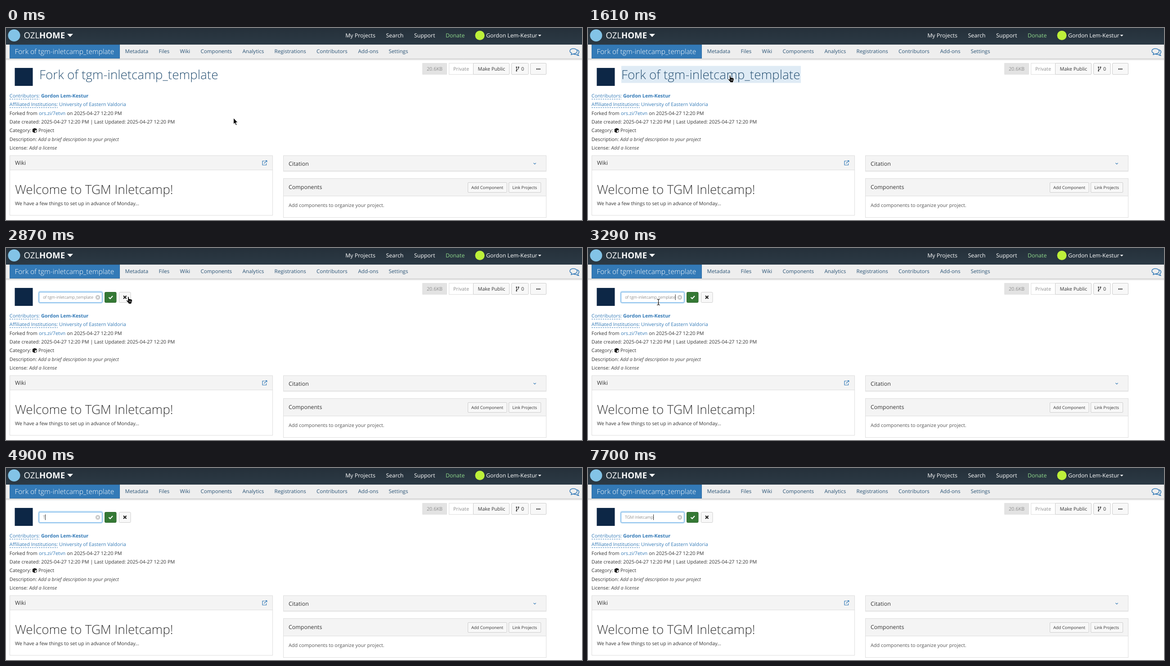
Write an HTML page that moves like this. It is 1280 px wide and 428 px high and loops after 8 s.

```html
<!DOCTYPE html>
<html lang="en">
<head>
<meta charset="utf-8">
<title>Project page</title>
<style>
  html, body { margin: 0; width: 100%; height: 100%; overflow: hidden; background: #fff; }
  svg { display: block; width: 100%; height: 100%; }
  text {
    font: 10.85px "Open Sans", "Noto Sans", sans-serif;
    fill: #333; white-space: pre; text-rendering: geometricPrecision;
  }
  .mid { text-anchor: middle; }
  .menu text { font-size: 12.4px; fill: #fff; }
  .tabs text { font-size: 11.6px; fill: #2a5375; }
  .head { font-size: 12.4px; }
  .small { font-size: 9.3px; }
  .big { font-size: 27.9px; font-weight: 300; }
  .link { fill: #337ab7; }
  .navy { fill: #2a5375; }
  .grey { fill: #8c8c8c; }
  .bold { font-weight: 700; }
  .it { font-size: 10.75px; font-style: italic; fill: #444; }
  .field { font-size: 9.3px; font-weight: 300; fill: #555; }
  .panel { fill: #fff; stroke: #ddd; }
  .bar { fill: #f4f4f4; stroke: #ddd; }
  .btn { fill: #f8f8f8; stroke: #ccc; }
  .dash { stroke: #337ab7; stroke-dasharray: 3 2; }
  .line { fill: none; stroke: #337ab7; stroke-width: 1.2; }
  .bubble { fill: #eee; stroke: #337ab7; stroke-width: 1.5; stroke-linejoin: round; }
  .pointer { fill: #000; stroke: #fff; stroke-linejoin: round; }
</style>
</head>
<body>
<svg viewBox="0 0 1280 428" preserveAspectRatio="none">
  <defs>
    <linearGradient id="dark" x2="0" y2="1">
      <stop stop-color="#25303a"/><stop offset="1" stop-color="#2c3a45"/>
    </linearGradient>
    <linearGradient id="shade" x2="0" y2="1">
      <stop stop-color="#000" stop-opacity=".2"/><stop offset="1" stop-color="#000" stop-opacity="0"/>
    </linearGradient>
    <path id="beamShape" d="M-3 0Q0 0 0 2Q0 0 3 0M0 2V11M-3 13Q0 13 0 11Q0 13 3 13M-1.5 8.5h3"/>
  </defs>
  <rect width="1280" height="428" fill="#fff"/>

  <!-- Top menu -->
  <rect width="1280" height="37" fill="url(#dark)"/>
  <circle cx="18" cy="16.5" r="13.5" fill="#83c3e6"/>
  <g class="menu">
    <text x="39.5" y="23" style="font-size:18.6px">OZL<tspan class="bold">HOME</tspan></text>
    <path d="M136 13h13l-6.5 7z" fill="#fff"/>
    <text x="754.2" y="20.7">My Projects</text>
    <text x="844.5" y="20.7">Search</text>
    <text x="907" y="20.7">Support</text>
    <text x="977" y="20.7" style="fill:#8fd98b">Donate</text>
    <circle cx="1053" cy="16.5" r="10.5" fill="#bdf03a"/>
    <text x="1067" y="20.7">Gordon Lem-Kestur</text>
    <path d="M1182.5 15h7l-3.5 3.7z" fill="#fff"/>
  </g>

  <!-- Project tabs -->
  <rect y="37" width="1280" height="31" fill="#eee"/>
  <rect y="68" width="1280" height="5" fill="url(#shade)"/>
  <rect x="8.5" y="37.5" width="244" height="30" fill="#337ab7" stroke="#2e6da4"/>
  <text x="19.5" y="57.5" style="font-size:15.5px;font-weight:300;fill:#fff">Fork of tgm-inletcamp_template</text>
  <g class="tabs">
    <text x="264.5" y="56.2">Metadata</text>
    <text x="339.5" y="56.2">Files</text>
    <text x="386.5" y="56.2">Wiki</text>
    <text x="432.5" y="56.2">Components</text>
    <text x="525.5" y="56.2">Analytics</text>
    <text x="596.5" y="56.2">Registrations</text>
    <text x="690" y="56.2">Contributors</text>
    <text x="782.5" y="56.2">Add-ons</text>
    <text x="850.5" y="56.2">Settings</text>
  </g>
  <path class="bubble" d="M1269 48.5c5.5 2 5.5 7 1.5 9q.3 2 2.5 4-4-.3-6-2.7-5 .5-8-2"/>
  <path class="bubble" d="M1255.5 59.5q2-1.500 2-3.300c-7-2.700-5.500-10.200 3.500-10.200 11 0 11 11.500 0 11.500q-2.500 1.700-5.500 2z"/>

  <!-- Project heading -->
  <rect x="19.5" y="89" width="40" height="40" fill="#0d2746"/>
  <g id="heading">
    <rect id="hover" x="74" y="84.5" width="399" height="38" fill="#dfebf5"/>
    <text class="big navy" x="74" y="114">Fork of tgm-inletcamp_template</text>
  </g>

  <g id="editor">
    <rect id="glow" x="73" y="97.5" width="141" height="24.5" rx="3" fill="none" stroke="#66afe9" stroke-width="4" stroke-opacity=".35"/>
    <rect x="73.5" y="98.5" width="140" height="23" rx="2" fill="#fff" stroke="#ccc"/>
    <rect id="ring" x="73.5" y="98.5" width="140" height="23" rx="2" fill="none" stroke="#5da8e6"/>
    <rect id="selection" x="82" y="103" width="113" height="14" fill="#b3d7fe"/>
    <text id="value" class="field" y="113.3"></text>
    <rect id="caret" y="103.5" width="1" height="12.5" fill="#222"/>
    <circle cx="204" cy="110" r="5.2" fill="#c8c8c8"/>
    <path d="M202 108l4 4m0-4l-4 4" stroke="#fff" stroke-width="1.2"/>
    <rect x="219.5" y="98.5" width="25.5" height="23" rx="2" fill="#357935" stroke="#2b652b"/>
    <path d="M228.5 110l3 3 5.500-6" fill="none" stroke="#fff" stroke-width="2.2"/>
    <rect class="btn" x="251.5" y="98.5" width="25.5" height="23" rx="2"/>
    <path d="M261 106.500l6.500 6.500m0-6.500l-6.500 6.500" stroke="#222" stroke-width="2.3"/>
  </g>

  <!-- Actions -->
  <rect x="925" y="78" width="55" height="26" fill="#e3e3e3" rx="1"/>
  <text class="mid grey" x="952.5" y="95">20.6KB</text>
  <rect class="panel" x="984.5" y="78.5" width="54" height="25"/>
  <text class="mid grey" x="1011.5" y="95">Private</text>
  <rect class="btn" x="1038.5" y="78.5" width="80" height="25" rx="1.5"/>
  <text class="mid" x="1078.8" y="95">Make Public</text>
  <rect class="btn" x="1123.5" y="78.5" width="37.5" height="25" rx="1.5"/>
  <path d="M1134.500 87v9m0-3q4.500-.5 4.500-4.500v-1" fill="none" stroke="#333" stroke-width="1.1"/>
  <g fill="#333">
    <circle cx="1134.5" cy="87.5" r="1.4"/>
    <circle cx="1139" cy="87.5" r="1.4"/>
    <circle cx="1134.5" cy="95.5" r="1.4"/>
  </g>
  <text x="1145" y="95">0</text>
  <rect class="btn" x="1165.5" y="78.5" width="35" height="25" rx="1.5"/>
  <g fill="#222">
    <circle cx="1179.7" cy="91.5" r="1.3"/>
    <circle cx="1183" cy="91.5" r="1.3"/>
    <circle cx="1186.3" cy="91.5" r="1.3"/>
  </g>

  <!-- Details -->
  <text class="link" x="7.8" y="154.8">Contributors:</text>
  <text class="link bold" x="78" y="154.8">Gordon Lem-Kestur</text>
  <path class="dash" d="M8 158.500h66M8 177.500h107"/>
  <text class="link" x="7.8" y="174.2">Affiliated Institutions:</text>
  <text class="link" x="118" y="174.2">University of Eastern Valdoria</text>
  <text x="7.8" y="193.5">Forked from</text>
  <text class="link" x="73" y="193.5">ors.zi/7etvn</text>
  <text x="135.3" y="193.5">on 2025-04-27 12:20 PM</text>
  <text x="7.8" y="212.9">Date created: 2025-04-27 12:20 PM | Last Updated: 2025-04-27 12:20 PM</text>
  <text x="7.8" y="232.3">Category:</text>
  <path d="M63.800 223l5 2.300v6.200l-5 2.500-5-2.500v-6.200z" fill="#222"/>
  <path d="M64.300 228.700l3.500-1.700v4l-3.500 1.800z" fill="#fff"/>
  <text x="72" y="232.3">Project</text>
  <text x="7.8" y="251.6">Description:</text>
  <text class="it" x="71.5" y="251.6">Add a brief description to your project</text>
  <text x="7.8" y="271">License:</text>
  <text class="it" x="51.5" y="271">Add a license</text>

  <!-- Wiki -->
  <rect class="panel" x="8.5" y="284.5" width="584" height="133"/>
  <rect class="bar" x="8.5" y="284.5" width="584" height="32"/>
  <text class="head" x="20" y="304.5">Wiki</text>
  <path class="line" d="M575 296.500h-5v9h8.500v-4M573.500 302l6-6.500m-3.500 0h3.700v3.700"/>
  <text class="big" x="20" y="369.7">Welcome to TGM Inletcamp!</text>
  <text x="20" y="394.5">We have a few things to set up in advance of Monday...</text>

  <!-- Citation and components -->
  <rect x="616" y="319" width="585" height="2" fill="#000" opacity=".06"/>
  <rect class="bar" x="616.5" y="284.5" width="584" height="34"/>
  <text class="head" x="628" y="306.5">Citation</text>
  <path class="line" d="M1172.300 300.800l2.700 2.700 2.700-2.700"/>
  <rect class="panel" x="616.5" y="335.5" width="584" height="87"/>
  <rect class="bar" x="616.5" y="335.5" width="584" height="39"/>
  <text class="head" x="628" y="359.3">Components</text>
  <rect class="btn" x="1026.5" y="344.5" width="86.5" height="22" rx="1.5"/>
  <text class="mid small" x="1069.5" y="358.8">Add Component</text>
  <rect class="btn" x="1117.5" y="344.5" width="71" height="22" rx="1.5"/>
  <text class="mid small" x="1152.5" y="358.8">Link Projects</text>
  <text x="628" y="399" style="fill:#555">Add components to organize your project.</text>

  <!-- Pointers, each with its hot spot at 0,0 -->
  <path id="arrow" class="pointer" d="M.5.5v14l3.100-2.800 2.200 5.200 2.300-1-2.200-5.100h4.300z"/>
  <g id="hand">
    <path class="pointer" d="M-1.300 0q1.300-1.300 2.600 0l.5 4.500 1.500-.3 1.200.8 1.500-.2 1 1 1.300.2.500 2-.8 4-1 1.500v2h-6l-1-2-4.500-5q.2-2 2-1l1.500 1.300z"/>
    <path d="M2 8v4M4 8v4M6 8v4" stroke="#fff" stroke-width=".6"/>
  </g>
  <g id="beam" fill="none" stroke-linecap="round">
    <use href="#beamShape" stroke="#fff" stroke-width="2.8"/>
    <use href="#beamShape" stroke="#111" stroke-width="1.2"/>
  </g>
</svg>
<script>
const LOOP = 8000, STEP = 70;
const OLD_NAME = "of tgm-inletcamp_template";
const NEW_NAME = "TGM Inletcamp";
const EDIT = 2100, SELECT = 3850, TYPE = 4900;
const keyTimes = [4900, 5110, 5250, 5460, 6090, 6230, 6440, 6650, 6930, 7140, 7350, 7420, 7700];

// Pointer path: time, x, y
const path = [
  [770, 505, 200], [1050, 384, 153], [1190, 384, 153], [1330, 348, 130],
  [1400, 326, 98], [1470, 314, 62], [1540, 314, 88], [1610, 315.5, 106],
  [2030, 315.5, 106], [2100, 311.5, 106], [2800, 311.5, 106],
  [2940, 232, 112], [3010, 188, 114], [3150, 156.5, 114]
];

const $ = id => document.getElementById(id);
const show = (id, on) => $(id).setAttribute("visibility", on ? "inherit" : "hidden");

function pointerAt(t) {
  const i = path.findIndex(p => p[0] > t);
  if (i < 0) return path[path.length - 1].slice(1);
  if (i === 0) return path[0].slice(1);
  const a = path[i - 1], b = path[i];
  const k = (t - a[0]) / (b[0] - a[0]);
  return [a[1] + (b[1] - a[1]) * k, a[2] + (b[2] - a[2]) * k];
}

function pointerKind(t, x, y) {
  if (t >= TYPE) return "";
  if (t < EDIT) return y > 84 && y < 122 && x < 473 ? "hand" : "arrow";
  if (x < 214) return "beam";
  return x < 245 || (x > 251 && x < 277) ? "hand" : "arrow";
}

function drawPointer(t) {
  const [x, y] = pointerAt(t);
  const kind = pointerKind(t, x, y);
  for (const id of ["arrow", "hand", "beam"]) show(id, id === kind);
  if (kind) $(kind).setAttribute("transform", `translate(${x} ${y})`);
  show("hover", kind === "hand" && t < EDIT);
}

function drawEditor(t) {
  const editing = t >= EDIT, typing = t >= TYPE;
  show("heading", !editing);
  show("editor", editing);

  const focus = Math.max(0, Math.min(1, (t - EDIT) / (2 * STEP)));
  $("ring").setAttribute("opacity", focus);
  $("glow").setAttribute("opacity", focus);

  const value = $("value");
  value.textContent = typing ? NEW_NAME.slice(0, keyTimes.filter(k => k <= t).length) : OLD_NAME;
  value.setAttribute("text-anchor", typing ? "start" : "end");
  value.setAttribute("x", typing ? 82 : 194);
  $("caret").setAttribute("x", typing ? 82 + value.getComputedTextLength() : 193.7);

  const selected = t >= SELECT && !typing;
  const blinkOff = t >= 2660 && t < 3290;
  show("selection", selected);
  show("caret", !selected && !blinkOff);
}

function draw(ms) {
  const t = Math.floor((ms % LOOP) / STEP + 1e-6) * STEP;
  drawEditor(t);
  drawPointer(t);
}

let start;
function tick(now) {
  start ??= now;
  draw(now - start);
  requestAnimationFrame(tick);
}
draw(0);
requestAnimationFrame(tick);
</script>
</body>
</html>
```
